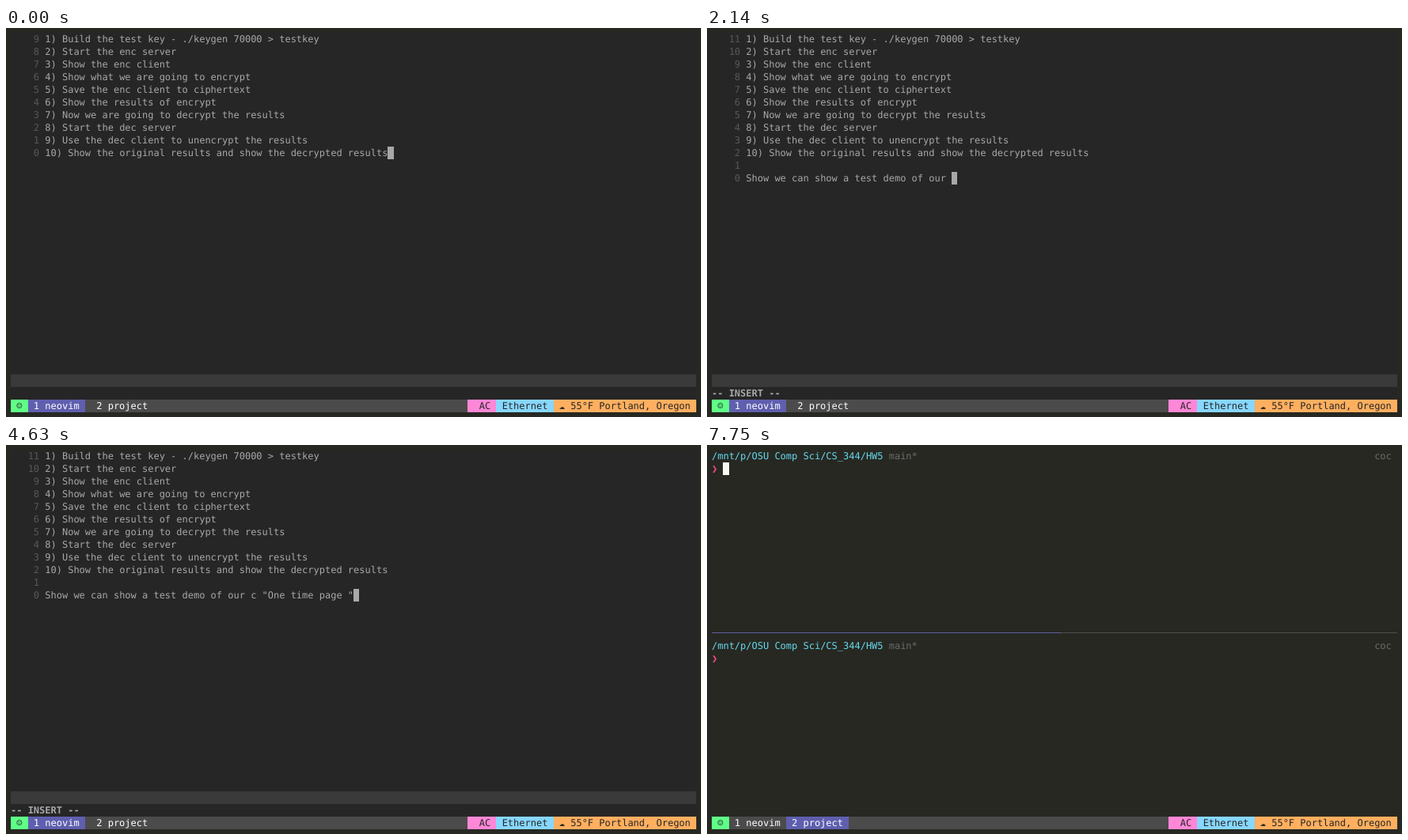
An HTML page for the animation above (8000 ms loop, 878 by 492 pixels).

```html
<!DOCTYPE html>
<html lang="en">
<head>
<meta charset="utf-8">
<title>Terminal session</title>
<style>
  html, body { margin: 0; width: 100%; height: 100%; overflow: hidden; background: #272822; }
  #stage {
    position: relative; width: 878px; height: 492px; overflow: hidden;
    font: 12px/16px "DejaVu Sans Mono", monospace;
    letter-spacing: -0.007px; text-rendering: geometricPrecision;
    white-space: pre; color: #a8a8a8;
  }
  #stage div { position: absolute; height: 16px; }
  #stage #editor, #stage #shell { inset: 0; height: auto; }
  #stage #paper { left: 6px; top: 6px; width: 866px; height: 464px; background: #262626; }
  .num { color: #585858; }
  .bold { font-weight: bold; }
  .path { color: #66d9ef; }
  .dim { color: #6c6c6c; }
  .arrow { color: #ff4d8d; }
  .dark { color: #262626; }
  .light { color: #fff; }
  #stage .rule { height: 1px; }
</style>
</head>
<body>
<div id="stage">
  <div id="editor"><div id="paper"></div></div>
  <div id="shell"></div>
</div>
<script>
const LOOP = 8000, CELL = 866 / 120, ROW = 16, PAD = 6, TYPE_ROW = 11, MENU_COLS = 16;
const stage = document.getElementById('stage');
const editor = document.getElementById('editor');
const shell = document.getElementById('shell');

const x = col => PAD + col * CELL;
const y = row => PAD + row * ROW;

function add(parent, className, style = {}) {
  const el = document.createElement('div');
  el.className = className;
  Object.assign(el.style, style);
  return parent.appendChild(el);
}

function text(parent, row, col, str, className = '') {
  const el = add(parent, className, { left: x(col) + 'px', top: y(row) + 'px' });
  el.textContent = str;
  return el;
}

function place(el, row, col, cols) {
  const left = Math.round(x(col));
  el.style.left = left + 'px';
  el.style.top = y(row) + 'px';
  el.style.width = Math.round(x(col + cols)) - left + 'px';
}

function block(parent, row, col, cols, color) {
  const el = add(parent, '', { background: color });
  place(el, row, col, cols);
  return el;
}

const notes = [
  '1) Build the test key - ./keygen 70000 > testkey',
  '2) Start the enc server',
  '3) Show the enc client',
  '4) Show what we are going to encrypt',
  '5) Save the enc client to ciphertext',
  '6) Show the results of encrypt',
  '7) Now we are going to decrypt the results',
  '8) Start the dec server',
  '9) Use the dec client to unencrypt the results',
  '10) Show the original results and show the decrypted results'
];

// [time, keys ("<" is backspace), menu words ("-" in front: none selected)]
const keys = [
  [980, 'S', 'Show Start Save'], [1040, 'how'], [1100, ' w', 'we what'], [1160, 'e '],
  [1230, 'ca'], [1290, 'n '], [1350, 'sho', 'show Show'], [1410, 'w '], [1470, 'a '],
  [1530, 'te', 'testkey test the'], [1590, 'st', 'testkey test'], [1710, ' '],
  [1770, 'd', 'dec decrypt decrypted'], [1830, 'em'], [1890, 'o '],
  [1960, 'o', 'of original'], [2020, 'f '], [2140, 'our '], [2670, 'c '],
  [3070, 'o'], [3130, '', 'of our original'], [3320, 'n', 'original'], [3450, 'e'],
  [3510, ' '], [3570, '<'], [3630, '<'], [3690, '<'], [3760, '<'], [3820, '"'],
  [3880, 'O'], [4080, 'n'], [4140, 'e'], [4200, ' '], [4270, 't', 'testkey test the to'],
  [4330, 'im'], [4390, 'e '], [4450, 'p'], [4510, 'age '], [4630, '"'],
  [4760, '<<'], [4820, '<<'], [4880, 'd'], [4940, '"'], [5000, ' '],
  [5260, 'e', 'encrypt enc'], [5320, 'n', 'encrypt enc'], [5380, 'c', 'encrypt enc'],
  [5440, 'r', 'encrypt'], [5640, 'p', '-encrypt'], [6030, '<', 'encrypt'], [6160, 'ypt'],
  [6360, 'i'], [6420, 'o'], [6480, 'n'], [6600, ' '], [6660, 's'], [6720, 'e', 'server'],
  [6850, 'r', 'server'], [6980, 'ver'], [7040, ' '], [7170, '. '], [7430, '<']
];

const base = { typed: '', menu: '', line: 9, col: 66, insert: false };
const states = [
  { ...base, at: 0 },
  { ...base, at: 530, insert: true },
  { ...base, at: 590, insert: true, line: 10, col: 6 },
  { ...base, at: 650, insert: true, line: 11, col: 6 }
];
let typed = '';
for (const [at, stroke, menu = ''] of keys) {
  for (const ch of stroke) typed = ch === '<' ? typed.slice(0, -1) : typed + ch;
  states.push({ at, typed, menu, line: TYPE_ROW, col: 6 + typed.length, insert: true });
}
states.push({ at: 7690, shell: true }, { at: 7750, shell: true, cursor: true });

// Editor
const numbers = Array.from({ length: 12 }, (_, row) => text(editor, row, 1, '', 'num'));
notes.forEach((note, row) => text(editor, row, 6, note));
const typedLine = text(editor, TYPE_ROW, 6, '');
const editCursor = block(editor, 9, 66, 1, '#a8a8a8');
const menuRows = Array.from({ length: 4 }, (_, i) => ({
  back: block(editor, 12 + i, 0, MENU_COLS, '#303030'),
  label: text(editor, 12 + i, 0, '')
}));
block(editor, 27, 0, 120, '#3a3a3a');
const mode = text(editor, 28, 0, '-- INSERT --', 'bold');

// Two shell panes
for (const row of [0, 15]) {
  text(shell, row, 0, '/mnt/p/OSU Comp Sci/CS_344/HW5', 'path');
  text(shell, row, 31, 'main*', 'dim');
  text(shell, row, 116, 'coc', 'dim');
  text(shell, row + 1, 0, '❯', 'arrow');
}
add(shell, 'rule', { left: '6px', top: '237px', width: '441px', background: '#5f5f9f' });
add(shell, 'rule', { left: '447px', top: '237px', width: '425px', background: '#4e4e4e' });
const shellCursor = block(shell, 1, 2, 1, '#f8f8f2');

// Status bar
block(stage, 29, 0, 120, '#4b4b4b');
block(stage, 29, 0, 3, '#5fff87');
const tab = block(stage, 29, 3, 10, '#5f5faf');
block(stage, 29, 80, 5, '#ff87d7');
block(stage, 29, 85, 10, '#87d7ff');
block(stage, 29, 95, 25, '#ffaf5f');
text(stage, 29, 1, '☺', 'dark');
text(stage, 29, 4, '1 neovim', 'light');
const project = text(stage, 29, 15, '2 project', 'light');
text(stage, 29, 82, 'AC', 'dark');
text(stage, 29, 86, 'Ethernet', 'dark');
text(stage, 29, 96, '☁', 'dark');
text(stage, 29, 98, '55°F Portland, Oregon', 'dark');

const show = (el, on) => { el.style.display = on ? '' : 'none'; };

function drawMenu({ typed, menu }) {
  const selected = !menu.startsWith('-');
  const words = menu.replace('-', '').split(' ').filter(Boolean);
  const width = Math.max(0, ...words.map(w => w.length));
  const col = 5 + typed.search(/\w*$/);
  menuRows.forEach(({ back, label }, i) => {
    const on = i < words.length, active = selected && i === 0;
    show(back, on);
    show(label, on);
    if (!on) return;
    place(back, 12 + i, col, MENU_COLS);
    back.style.background = active ? '#5fafff' : '#303030';
    label.style.left = x(col + 1) + 'px';
    label.className = active ? 'dark' : '';
    label.textContent = words[i].padEnd(width) + ' [A]';
  });
}

function draw(state) {
  const inShell = !!state.shell;
  show(editor, !inShell);
  show(shell, inShell);
  place(tab, 29, inShell ? 13 : 3, inShell ? 11 : 10);
  project.style.left = x(inShell ? 14 : 15) + 'px';
  if (inShell) return show(shellCursor, state.cursor);
  numbers.forEach((el, row) => {
    el.textContent = row <= state.line ? String(state.line - row).padStart(4) : '';
  });
  typedLine.textContent = state.typed;
  place(editCursor, state.line, state.col, 1);
  show(mode, state.insert);
  drawMenu(state);
}

let current;
function tick() {
  const t = performance.now() % LOOP;
  const next = states.findLast(s => s.at <= t);
  if (next !== current) draw(current = next);
  requestAnimationFrame(tick);
}
tick();
</script>
</body>
</html>
```
